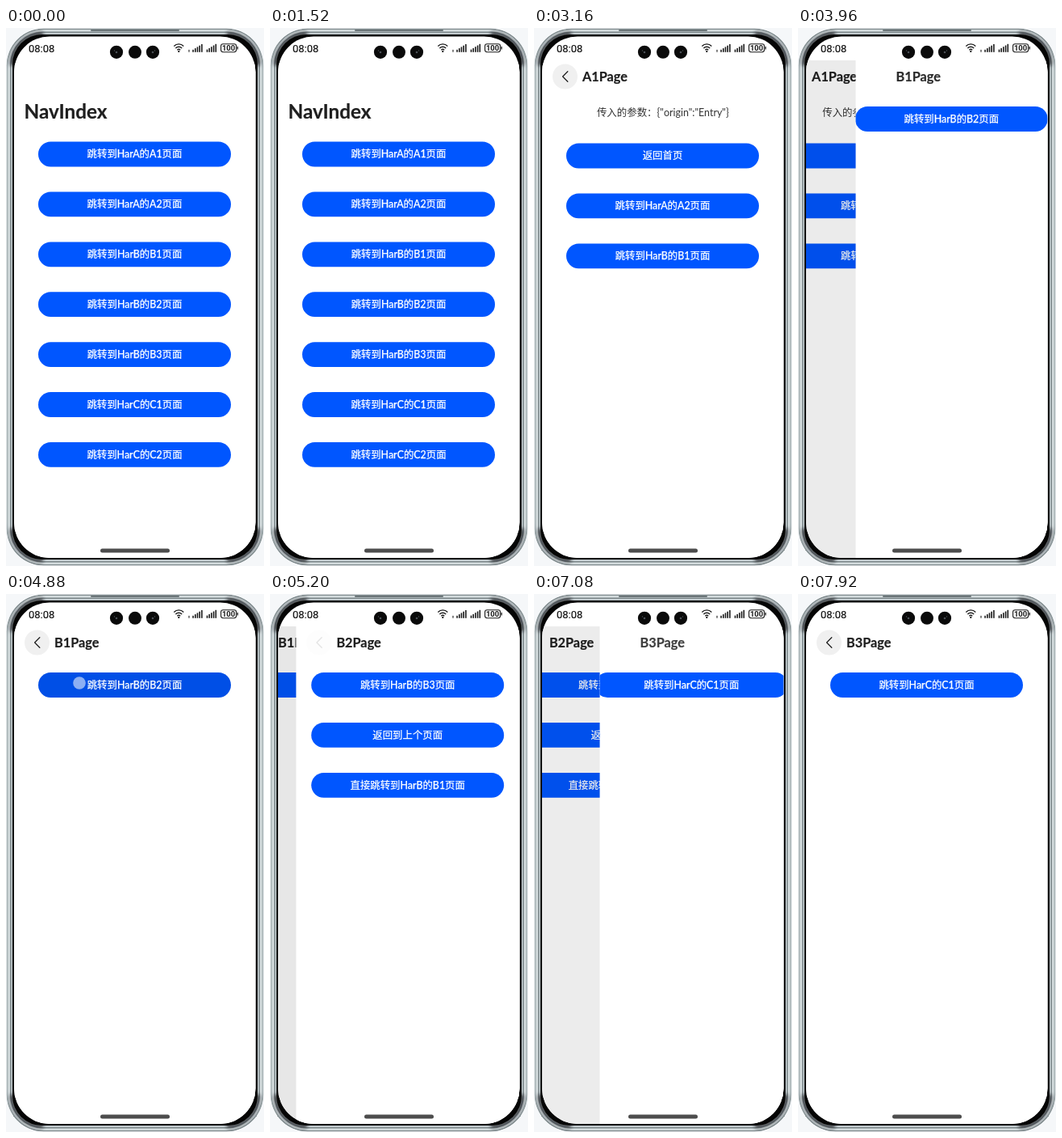
These frames come from a looping animation (320x665 px, 8 s). An HTML page:

```html
<!DOCTYPE html>
<html lang="zh">
<head>
<meta charset="utf-8">
<title>NavIndex</title>
<style>
  html, body { margin: 0; width: 100%; height: 100%; overflow: hidden; background: #f5f7f9; }
  svg { display: block; width: 320px; height: 665px; }
  text { font-family: Lato, "Noto Sans CJK SC", "Noto Sans CJK", sans-serif; }
  .label { font-size: 12.4px; font-weight: 500; fill: #fff; stroke: #fff; stroke-width: .25px; text-anchor: middle; }
  .note { font-size: 12.45px; fill: #333; text-anchor: middle; }
  .title { font-size: 16.3px; font-weight: 700; fill: #1f1f1f; stroke: #1f1f1f; stroke-width: .2px; }
  .home { font-size: 24.3px; }
  .clock { font: 400 13px Roboto, sans-serif; fill: #111; stroke: #111; stroke-width: .15px; }
  .level { font: 700 9.5px Roboto, sans-serif; fill: #1a1a1a; text-anchor: middle; }
</style>
</head>
<body>
<svg viewBox="0 0 320 665">
  <defs>
    <clipPath id="phone"><rect x=".5" y=".5" width="319" height="664" rx="46"/></clipPath>
    <clipPath id="screen"><rect x="10" y="10.5" width="299.5" height="644.5" rx="44"/></clipPath>
    <clipPath id="reveal"><rect id="edge" x="10" y="40" width="300" height="615"/></clipPath>
    <linearGradient id="metal" x2="0" y2="1">
      <stop offset="0" stop-color="#7d888b"/>
      <stop offset=".08" stop-color="#a9b4b7"/>
      <stop offset=".92" stop-color="#a9b4b7"/>
      <stop offset="1" stop-color="#7d888b"/>
    </linearGradient>
    <filter id="soft" x="-10%" y="-10%" width="120%" height="120%"><feGaussianBlur stdDeviation="2"/></filter>
  </defs>

  <g clip-path="url(#phone)">
    <rect x=".5" y=".5" width="319" height="664" rx="46" fill="url(#metal)"/>
    <rect x="2.5" y="2" width="315" height="661" rx="44" fill="#d3dbdd"/>
    <rect x="5" y="4.5" width="310" height="656" rx="41" fill="#7f8a8d"/>
    <rect x="6.5" y="6" width="307" height="653" rx="39" fill="#c3cccf"/>
    <path d="M8 46A38 38 0 0 1 46 8M274 8A38 38 0 0 1 312 46M312 619A38 38 0 0 1 274 657M46 657A38 38 0 0 1 8 619"
      fill="none" stroke="#16191a" stroke-width="6" opacity=".8" filter="url(#soft)"/>
    <rect x="8" y="8" width="304" height="649" rx="37" fill="#050505"/>
    <rect x="105" y="2" width="110" height="2" rx="1" fill="#6c7679"/>
  </g>

  <g clip-path="url(#screen)">
    <rect width="320" height="665" fill="#fff"/>
    <g id="pages"></g>
    <rect x="117" y="643.5" width="86" height="5" rx="2.5" fill="#4d4d4d"/>
  </g>

  <g id="status">
    <text class="clock" x="28" y="29.6">08:08</text>
    <g fill="none" stroke="#1a1a1a" stroke-width="1.4">
      <path d="M208.3 22.4a8.4 8.4 0 0 1 12 0M210.4 24.9a5.5 5.5 0 0 1 7.8 0M212.4 27.2a2.8 2.8 0 0 1 3.8 0"/>
      <rect x="266.6" y="19.7" width="19" height="10" rx="2.6" stroke-width="1.1"/>
    </g>
    <circle cx="214.3" cy="29" r="1.1"/>
    <rect x="286.6" y="22.8" width="1.3" height="3.8" rx=".6" fill="#1a1a1a"/>
    <text class="level" x="276.1" y="28.1">100</text>
    <path d="M226 28.2l1-1.6 1 1.6h-.6v1.8h-.8v-1.8z" fill="#1a1a1a"/>
    <g fill="#0a0a0a">
      <circle cx="137" cy="29.8" r="8.1"/><circle cx="160" cy="29.8" r="8"/><circle cx="182" cy="29.8" r="8.1"/>
    </g>
    <g fill="#4a4f55">
      <circle cx="137" cy="30" r="1.3"/><circle cx="182" cy="30" r="1.3"/>
      <circle cx="134.5" cy="28" r=".7"/><circle cx="184.5" cy="28" r=".7"/>
    </g>
  </g>
</svg>

<script>
const NS = 'http://www.w3.org/2000/svg';
const LOOP = 8000, TICK = 40, WIDTH = 300, MID = 159.5;
const BLUE = '#0056ff', PRESSED = '#004fe6';
const $ = id => document.getElementById(id);
const clamp = v => Math.max(0, Math.min(1, v));

function add(parent, tag, attrs = {}, text) {
  const el = document.createElementNS(NS, tag);
  for (const k in attrs) el.setAttribute(k, attrs[k]);
  if (text) el.textContent = text;
  return parent.appendChild(el);
}
const shift = (el, x) => el.setAttribute('transform', `translate(${x.toFixed(2)})`);
const show = (el, on) => el.setAttribute('display', on ? 'inline' : 'none');

const go = name => `跳转到Har${name[0]}的${name}页面`;
const specs = [
  { title: 'NavIndex', home: true, top: 156, labels: ['A1', 'A2', 'B1', 'B2', 'B3', 'C1', 'C2'].map(go) },
  { title: 'A1Page', top: 158, note: '传入的参数：{"origin":"Entry"}', labels: ['返回首页', go('A2'), go('B1')] },
  { title: 'B1Page', top: 112.5, labels: [go('B2')] },
  { title: 'B2Page', top: 112.5, labels: [go('B3'), '返回到上个页面', '直接' + go('B1')] },
  { title: 'B3Page', top: 112.5, labels: [go('C1')] }
];

// press / release / start of slide in ms; button index and touch point
const steps = [
  { press: 2000, release: 2240, slide: 2323.7, button: 0, x: 91, y: 155 },
  { press: 3680, release: 3760, slide: 3800, button: 2, x: 91, y: 280 },
  { press: 4800, release: 4920, slide: 4970, button: 0, x: 91, y: 110 },
  { press: 6800, release: 6900, slide: 6931, button: 0, x: 91, y: 111 }
];

function buildPage(spec) {
  const root = add($('pages'), 'g');
  add(root, 'rect', { x: 10, y: 40, width: WIDTH, height: 615, fill: '#fff' });
  const body = add(root, 'g'), head = add(root, 'g');
  if (spec.note) add(body, 'text', { class: 'note', x: MID + .3, y: 108.5 }, spec.note);
  const buttons = spec.labels.map((label, i) => {
    const y = spec.top + i * 61.9;
    const pill = add(body, 'rect', { x: 40, y: y - 15.4, width: 239, height: 30.8, rx: 15.4, fill: BLUE });
    add(body, 'text', { class: 'label', x: MID, y: y + 4.4 }, label);
    return pill;
  });
  const back = add(head, 'g');
  if (!spec.home) {
    add(back, 'circle', { cx: 38.5, cy: 60, r: 15.5, fill: '#f0f0f0' });
    add(back, 'path', {
      d: 'M41.8 53.8L35.6 60l6.2 6.2', fill: 'none', stroke: '#222',
      'stroke-width': 1.3, 'stroke-linecap': 'round', 'stroke-linejoin': 'round'
    });
  }
  const title = spec.home
    ? add(head, 'text', { class: 'title home', x: 22.5, y: 111.5 }, spec.title)
    : add(head, 'text', { class: 'title', x: 60, y: 66 }, spec.title);
  const shade = add(root, 'rect', { x: 10, y: 40, width: WIDTH, height: 615, opacity: 0 });
  return { root, body, head, back, title, buttons, shade };
}

function place(page, { body = 0, head = 0, title = 1, back = 1, shade = 0, clip = false }) {
  show(page.root, true);
  shift(page.body, body);
  shift(page.head, head);
  page.title.setAttribute('opacity', title);
  page.back.setAttribute('opacity', back);
  page.shade.setAttribute('opacity', shade);
  if (clip) page.root.setAttribute('clip-path', 'url(#reveal)');
  else page.root.removeAttribute('clip-path');
}

const pages = specs.map(buildPage);
const dot = add($('pages'), 'circle', { r: 7.8, fill: '#fff', opacity: .55 });

[[231.3, 3], [248.7, 3.2]].forEach(([x0, low]) => {
  for (let i = 0; i < 5; i++) {
    const h = low + i * 1.7;
    add($('status'), 'rect', { x: x0 + i * 2.7, y: 29.8 - h, width: 1.6, height: h, fill: '#1a1a1a' });
  }
});

// critically damped spring
const spring = s => 1 - (1 + 18.5 * s) * Math.exp(-18.5 * s);

function draw(t) {
  const current = steps.filter(s => t >= s.slide).length;
  pages.forEach(p => show(p.root, false));

  const age = current ? (t - steps[current - 1].slide) / 1000 : 1;
  if (age < .6) {
    const p = spring(age), off = WIDTH * (1 - p);
    $('edge').setAttribute('x', 10 + off);
    place(pages[current - 1], { body: -60 * p, head: -54 * p, back: clamp(1 - 2 * p), shade: .1 * p });
    place(pages[current], {
      body: off / 2, head: off, clip: true,
      title: clamp((p - .4) / .42), back: clamp((age - .2) / .25)
    });
  } else {
    place(pages[current], {});
  }

  const touch = steps.find(s => t >= s.press && t < s.release);
  show(dot, !!touch);
  pages.forEach(p => p.buttons.forEach(b => b.setAttribute('fill', BLUE)));
  if (touch) {
    dot.setAttribute('cx', touch.x);
    dot.setAttribute('cy', touch.y);
    pages[current].buttons[touch.button].setAttribute('fill', PRESSED);
  }
}

const start = performance.now();
function frame() {
  const t = (performance.now() - start) % LOOP;
  draw(Math.floor(t / TICK) * TICK);
  requestAnimationFrame(frame);
}
frame();
</script>
</body>
</html>
```
